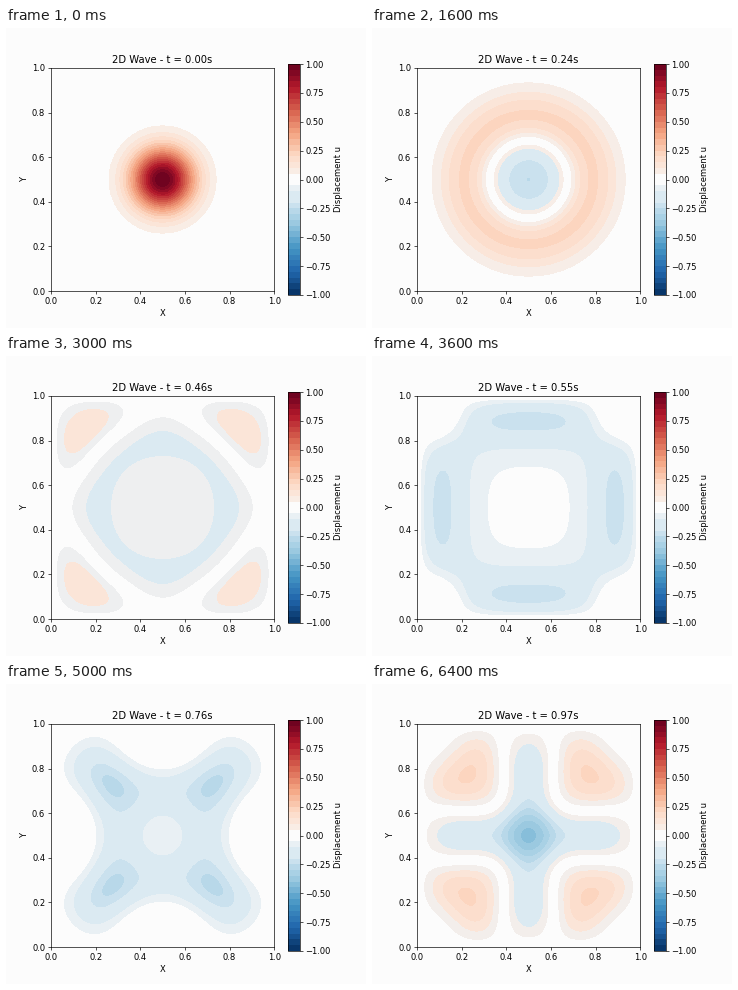
A matplotlib script for the animation above (6600 ms loop, 360 by 300 pixels).

```python
import numpy as np
import matplotlib.pyplot as plt
from matplotlib.animation import FuncAnimation
from matplotlib.colors import ListedColormap, Normalize, to_rgb

FRAMES, INTERVAL, STEPS = 33, 200, 3
N, COURANT, SIGMA, DAMPING = 70, 0.7, 0.098, 0.12
PAPER = "#fcfcfc"

x = np.linspace(0, 1, N)
X, Y = np.meshgrid(x, x)
dt = COURANT * (x[1] - x[0])


def bend(u):
    """Scaled Laplacian inside the fixed boundary."""
    out = np.zeros_like(u)
    out[1:-1, 1:-1] = COURANT**2 * (
        u[2:, 1:-1] + u[:-2, 1:-1] + u[1:-1, 2:] + u[1:-1, :-2] - 4 * u[1:-1, 1:-1]
    )
    return out


def clamp(u):
    u[[0, -1], :] = 0
    u[:, [0, -1]] = 0
    return u


def simulate():
    """Leapfrog solution of the wave equation, one state per frame."""
    drag = DAMPING * dt / 2
    u = clamp(np.exp(-((X - 0.5) ** 2 + (Y - 0.5) ** 2) / (2 * SIGMA**2)))
    prev = u + 0.5 * bend(u)  # zero initial velocity
    states = [u]
    for step in range(1, (FRAMES - 1) * STEPS + 1):
        nxt = clamp((2 * u - (1 - drag) * prev + bend(u)) / (1 + drag))
        prev, u = u, nxt
        if step % STEPS == 0:
            states.append(u)
    return states


states = simulate()

levels = np.linspace(-1, 1, 41)
mids = (levels[1:] + levels[:-1]) / 2
base = plt.get_cmap("RdBu_r")((mids + 1) / 2)[:, :3]
base[19:21] = to_rgb(PAPER)
base[16:18] = base[16:18].mean(axis=0)


def palette(u):
    """Both faint bands share one tint, weighted by the area they cover."""
    cold = np.sum((u < -0.05) & (u > -0.1)) + 1
    hot = np.sum((u > 0.05) & (u < 0.1)) + 1
    colors = base.copy()
    colors[[18, 21]] = np.average(base[[18, 21]], axis=0, weights=[cold, hot])
    return colors


def fill(u, colors):
    return ax.contourf(X, Y, u, levels=levels, cmap=ListedColormap(colors),
                       norm=Normalize(-1, 1))


fig, ax = plt.subplots(figsize=(6, 5), dpi=60, facecolor=PAPER)
ax.set_facecolor(PAPER)
ax.set_aspect("equal")
ax.set_xlabel("X")
ax.set_ylabel("Y")
title = ax.set_title("")

surface = fill(states[0], base)
fig.colorbar(surface, ax=ax, ticks=np.linspace(-1, 1, 9), label="Displacement u")
ax.set_xlim(0, 1)
ax.set_ylim(0, 1)


def update(i):
    global surface
    surface.remove()
    surface = fill(states[i], palette(states[i]))
    title.set_text(f"2D Wave - t = {i * STEPS * dt:.2f}s")
    return surface, title


anim = FuncAnimation(fig, update, frames=FRAMES, init_func=lambda: (),
                     interval=INTERVAL, repeat=True, repeat_delay=0, blit=False)
plt.show()
```
